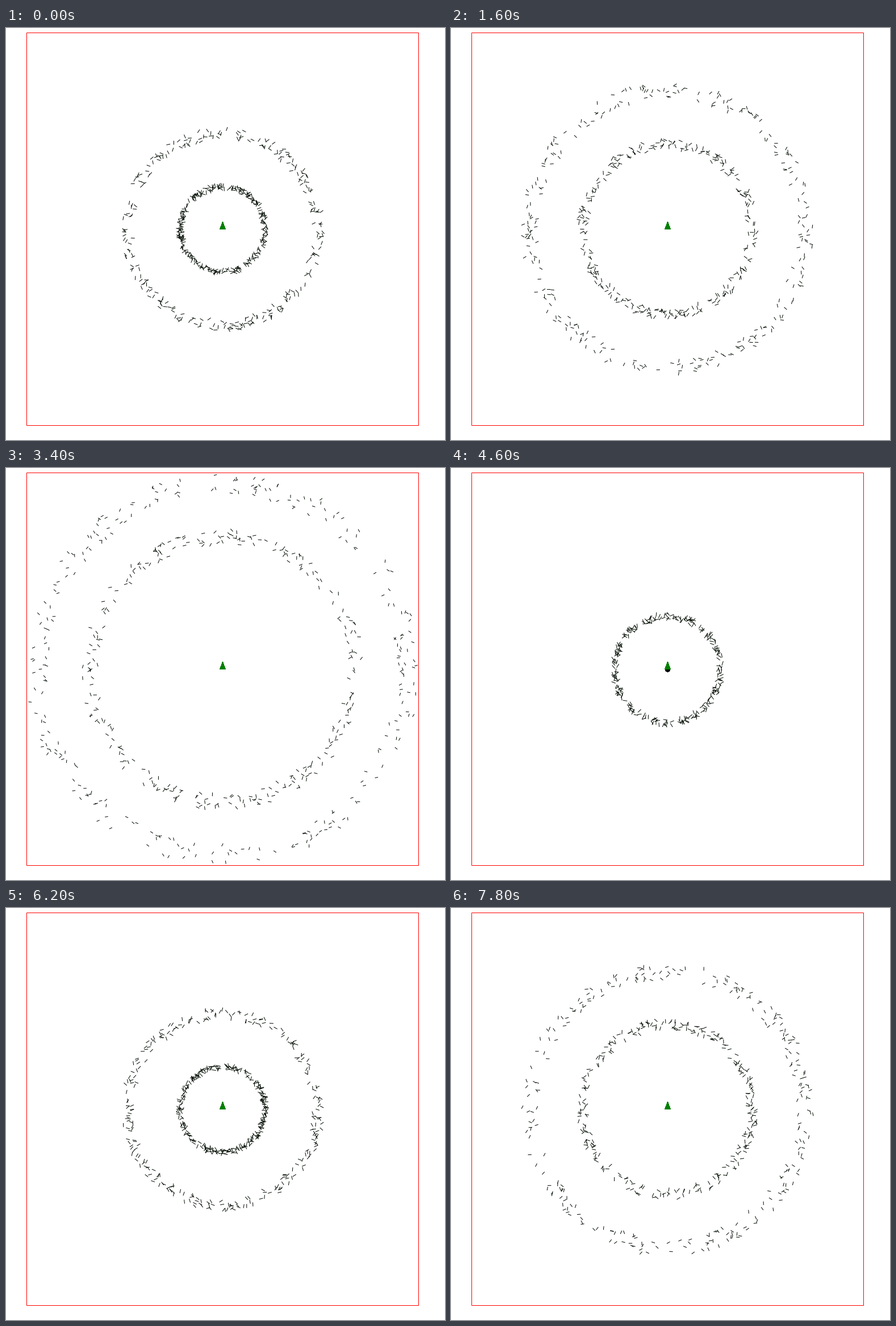
These frames come from a looping animation (773x724 px, 8 s). A matplotlib script:

```python
import numpy as np
import matplotlib.pyplot as plt
from matplotlib.animation import FuncAnimation
from matplotlib.collections import LineCollection
from matplotlib.patches import Polygon, Rectangle

W, H, DPI = 773, 724, 100
PX = 72 / DPI
CX, CY = 381.5, 354
FRAMES, STEP_MS = 40, 200
COUNT = 280             # dashes per ring
SLOW, FAST = 8.8, 9.88  # pixels per tick
RESTART = 18            # last step before the wave starts anew
SECOND = 23             # step at which the second ring is sent out

fig = plt.figure(figsize=(W / DPI, H / DPI), dpi=DPI, facecolor="white")
ax = fig.add_axes([0, 0, 1, 1])
ax.set_xlim(0, W)
ax.set_ylim(H, 0)
ax.axis("off")

wall = Rectangle((36.5, 8.5), 690, 690, fill=False, edgecolor="red",
                 linewidth=PX, snap=False, joinstyle="miter", zorder=1)
ax.add_patch(wall)
ax.add_patch(Polygon([(381.5, 340), (386.5, 354), (376.5, 354)],
                     facecolor="green", edgecolor="none",
                     antialiased=False, zorder=3))
dashes = LineCollection([], colors="#000a00", linewidths=PX, zorder=2)
ax.add_collection(dashes)
dashes.set_clip_path(wall)


def ring_ages(step):
    """Ticks since each visible ring left the centre."""
    if step <= RESTART:
        return [step + 8, step + 18]
    if step < SECOND:
        return [2 * (step - RESTART)]  # a lone ring runs twice as fast
    return [step - SECOND, step - SECOND + 10]


def ring(age, rng):
    """Short dashes scattered in a band that widens with age."""
    angle = rng.uniform(0, 2 * np.pi, COUNT)
    radius = age * rng.uniform(SLOW, FAST, COUNT)
    tilt = rng.uniform(0, np.pi, COUNT)
    half = (8.4 - 0.08 * age) / 2
    mid = np.column_stack([CX + radius * np.cos(angle),
                           CY + radius * np.sin(angle)])
    reach = half * np.column_stack([np.cos(tilt), np.sin(tilt)])
    return np.stack([mid - reach, mid + reach], axis=1)


def draw(step):
    rng = np.random.default_rng(500 + step)
    dashes.set_segments(np.concatenate([ring(a, rng) for a in ring_ages(step)]))
    return [dashes]


anim = FuncAnimation(fig, draw, frames=FRAMES, init_func=lambda: draw(0),
                     interval=STEP_MS, repeat=True, repeat_delay=0, blit=False)
plt.show()
```
